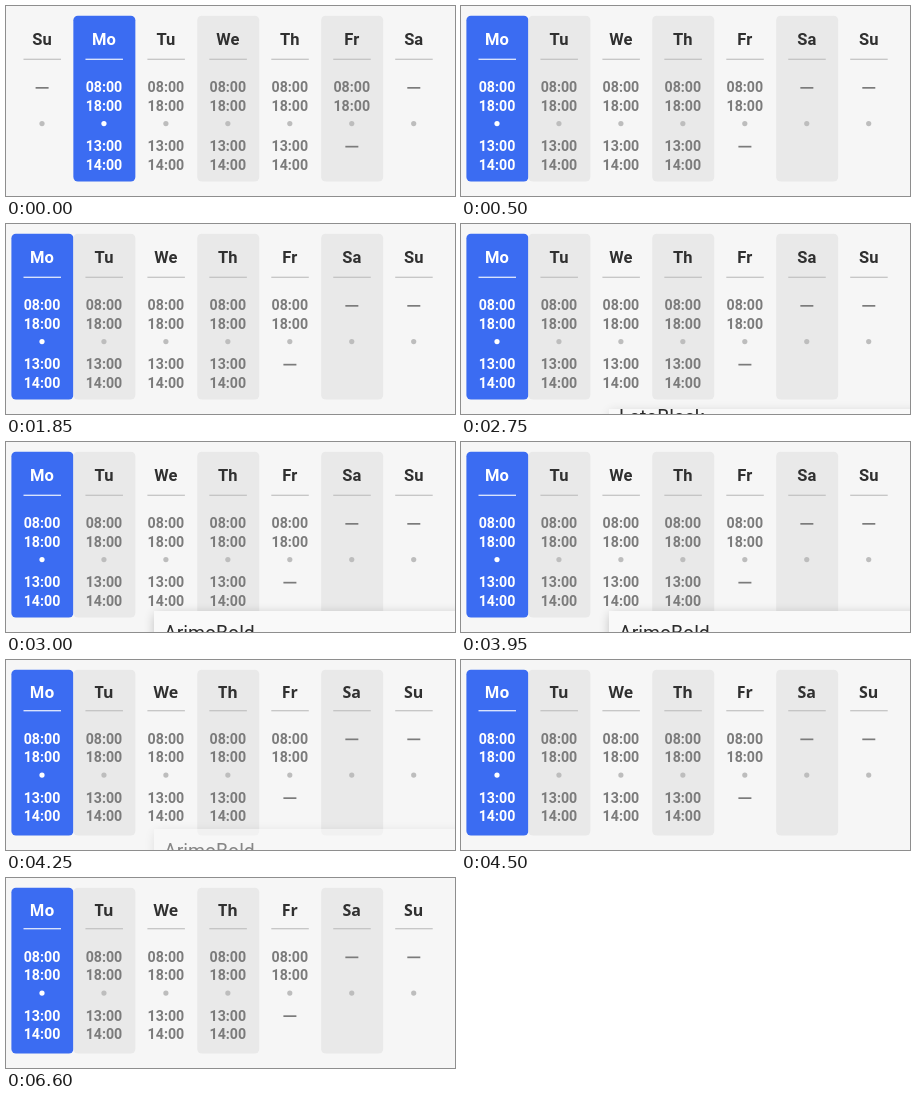
Recreate the animation shown at these times as an HTML page. Size 449x190 px, loop 8000 ms.

```html
<!DOCTYPE html>
<html lang="en">
<head>
<meta charset="utf-8">
<title>Opening hours</title>
<style>
  html, body { margin: 0; width: 100%; height: 100%; overflow: hidden; background: #f6f6f6; }
  svg { display: block; width: 100%; height: 100%; }
  text { font-family: Roboto, sans-serif; }
  .day { font-weight: 700; font-size: 16.5px; text-anchor: middle; }
  .alt .day { font-family: "Noto Sans", sans-serif; font-size: 16px; }
  .hour { font-weight: 700; font-size: 14.2px; text-anchor: middle; }
  .option { font-size: 19.4px; fill: #2c2c2c; }
</style>
</head>
<body>
<svg id="stage" viewBox="0 0 449 190">
  <defs>
    <filter id="blur" x="-20%" y="-50%" width="140%" height="200%">
      <feGaussianBlur stdDeviation="6"/>
    </filter>
  </defs>
  <g id="week"></g>
  <g id="menu">
    <rect id="shade" x="149" width="330" height="60" filter="url(#blur)"/>
    <rect id="sheet" x="148" width="330" height="60" fill="#f9f9f9"/>
    <text id="option" class="option" x="158"></text>
  </g>
</svg>
<script>
const LOOP = 8000;
const DAYS = ["Su", "Mo", "Tu", "We", "Th", "Fr", "Sa"];
const COL = 61.95;
const MORNING = ["08:00", "18:00"];
const AFTERNOON = ["13:00", "14:00"];
const $ = id => document.getElementById(id);

const text = (cls, x, y, fill, value) =>
  `<text class="${cls}" x="${x}" y="${y}" fill="${fill}">${value}</text>`;

function hours(x, y, fill, pair) {
  return pair
    ? pair.map((h, i) => text("hour", x, y + i * 18.5, fill, h)).join("")
    : `<rect x="${x - 6.4}" y="${y - 5.2}" width="13" height="1.7" fill="${fill}"/>`;
}

function column(i, first, lift) {
  const day = (i + first) % 7;
  const active = day === 1;
  const x = 36 + i * COL;
  const pick = (on, off) => active ? on : off;
  const back = active ? "#3b6cf2" : i % 2 ? "#e9e9e9" : "none";
  const ink = pick("#fff", "#7b7b7b");
  const open = day > 0 && day < 6;
  const late = open && day < 5;
  return `<rect x="${x - 30.6}" y="9.7" width="62" height="165.8" rx="4.5" fill="${back}"/>`
    + text("day", x, lift ? 38 : 39.4, pick("#fff", "#303030"), DAYS[day])
    + `<rect x="${x - 18.5}" y="${52.7 - lift}" width="37.5" height="1.1" fill="${pick("#fff", "#bcbcbc")}"/>`
    + hours(x, 86.2 - lift, ink, open && MORNING)
    + `<circle cx="${x}" cy="${117.6 - lift}" r="2.6" fill="${pick("#fff", "#bdbdbd")}"/>`
    + (open ? hours(x, 145 - lift, ink, late && AFTERNOON) : "");
}

function drawWeek(first, lift) {
  $("week").setAttribute("class", lift ? "alt" : "");
  $("week").innerHTML = DAYS.map((_, i) => column(i, first, lift)).join("");
}

function drawMenu(label, top, baseline, shade, opacity) {
  $("menu").setAttribute("opacity", opacity);
  $("shade").setAttribute("y", top + 3);
  $("shade").setAttribute("opacity", shade);
  $("sheet").setAttribute("y", top);
  $("option").setAttribute("y", baseline);
  $("option").textContent = label;
}

const hidden = ["", 200, 220, 0, 0];
const steps = [
  { at: 0, week: [0, 0], menu: hidden },
  { at: 500, week: [1, 0], menu: hidden },
  { at: 2750, week: [1, 0], menu: ["LatoBlack", 185, 199.5, 0.16, 1] },
  { at: 3000, week: [1, 0], menu: ["ArimoBold", 169, 198, 0.24, 1] },
  { at: 3500, week: [1, 0], menu: ["ArimoBold", 169, 198, 0.24, 1] },
  { at: 4250, week: [1, 2.5], menu: ["ArimoBold", 169, 198, 0.2, 0.55] },
  { at: 4500, week: [1, 2.5], menu: hidden }
];

let shown;
function render(ms) {
  const t = ms % LOOP;
  const step = steps.findLast(s => s.at <= t);
  if (step === shown) return;
  shown = step;
  drawWeek(...step.week);
  drawMenu(...step.menu);
}

const start = performance.now();
function tick() {
  render(performance.now() - start);
  requestAnimationFrame(tick);
}
tick();
</script>
</body>
</html>
```
